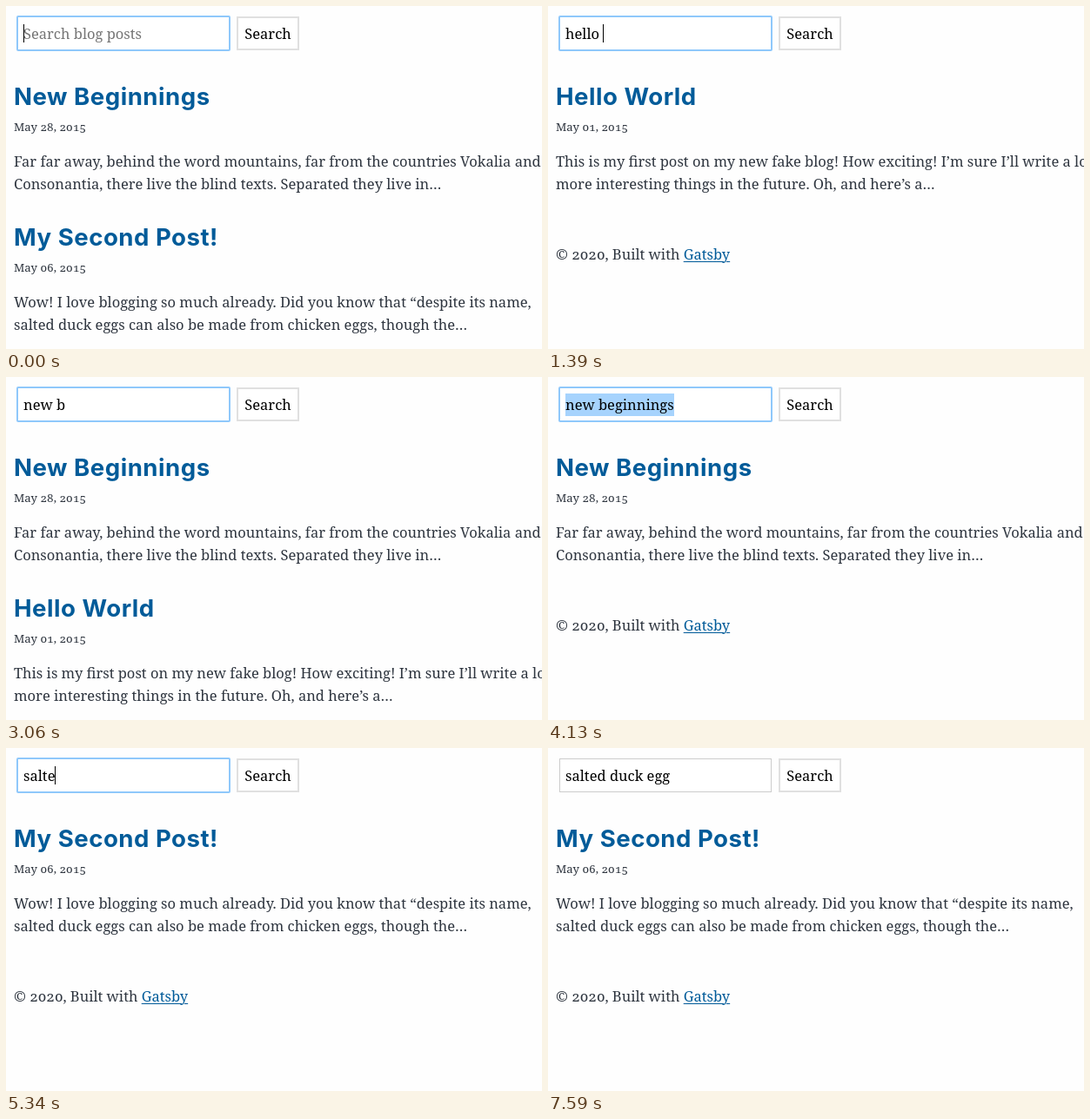
Write an HTML page that moves like this. It is 616 px wide and 395 px high and loops after 8120 ms.

```html
<!DOCTYPE html>
<html lang="en">
<head>
<meta charset="utf-8">
<title>Blog search</title>
<style>
  html, body { margin: 0; width: 100%; height: 100%; overflow: hidden; background: #fefefe; }
  body {
    position: relative;
    font: 16.5px/26px "Noto Serif", serif;
    font-variant-numeric: oldstyle-nums tabular-nums;
    color: #2e353f;
    white-space: nowrap;
  }
  .box, .ring, .field, .hint, article, h2, time, p, footer { position: absolute; margin: 0; }
  .box { box-sizing: border-box; top: 12px; height: 39px; border: 1px solid #ccc; background: #fff; color: #000; }
  .input { left: 13px; width: 244px; }
  .button { left: 265px; width: 72px; border: 2px solid #e0e0e0; line-height: 35px; text-align: center; }
  .ring {
    box-sizing: border-box; left: 12px; top: 11px; width: 246px; height: 41px;
    border: 2px solid #8fc8fb; border-radius: 2px;
    animation: blur 8120ms linear infinite;
  }
  @keyframes blur { 0%, 90.27% { opacity: 1 } 93.47%, 100% { opacity: 0 } }
  .field, .hint { left: 20px; top: 19px; white-space: pre; }
  .field { display: flex; color: #000; }
  .hint { color: #757575; }
  .selected { background: #a6d3fd; }
  #caret { width: 1px; height: 21px; margin-top: 2px; background: #000; }
  article { left: 9px; top: 0; }
  h2 {
    top: 87px; font: 700 27.6px/34px Inter, sans-serif; letter-spacing: 0.5px;
    font-optical-sizing: none; color: #005b99;
  }
  time { top: 129px; font-size: 13.2px; line-height: 20px; }
  p { top: 166px; }
  footer { left: 9px; top: 273px; }
  footer span { color: #005b99; text-decoration: underline 1px; text-underline-offset: 2px; }
  [hidden] { display: none; }
</style>
</head>
<body>
  <div class="box input"></div>
  <div class="ring"></div>
  <div class="hint" id="hint">Search blog posts</div>
  <div class="field"><span id="query"></span><i id="caret"></i></div>
  <div class="box button">Search</div>

  <article id="N">
    <h2>New Beginnings</h2>
    <time>May 28, 2015</time>
    <p>Far far away, behind the word mountains, far from the countries Vokalia and<br>Consonantia, there live the blind texts. Separated they live in…</p>
  </article>
  <article id="S">
    <h2>My Second Post!</h2>
    <time>May 06, 2015</time>
    <p>Wow! I love blogging so much already. Did you know that “despite its name,<br>salted duck eggs can also be made from chicken eggs, though the…</p>
  </article>
  <article id="H">
    <h2>Hello World</h2>
    <time>May 01, 2015</time>
    <p>This is my first post on my new fake blog! How exciting! I’m sure I’ll write a lot<br>more interesting things in the future. Oh, and here’s a…</p>
  </article>
  <footer id="footer">© 2020, Built with <span>Gatsby</span></footer>

<script>
  const LOOP = 8120, POST_GAP = 162;
  const LEAD = 16; // a drawn frame appears one refresh later
  const OFF = 0, ON = 1, SELECTED = 2;
  const $ = id => document.getElementById(id);
  const steps = [];

  const add = (time, text, caret, posts) => steps.push({ time, text, caret, posts });

  // Types one more letter of the phrase at each evenly spaced step.
  function type(from, to, phrase, start, posts) {
    const count = phrase.length - start;
    const gap = (to - from) / (count - 1);
    for (let i = 0; i < count; i++)
      add(from + gap * i, phrase.slice(0, start + i + 1), ON, posts);
  }

  add(0, "", ON, "NS");
  add(240, "", OFF, "NS");
  add(440, "h", ON, "NS");
  add(510, "h", ON, "H");
  type(600, 880, "hello", 1, "H");
  type(1390, 1770, "hello world", 5, "H");
  add(1920, "hello world", OFF, "H");
  add(2160, "hello world", SELECTED, "H");

  add(2420, "", ON, "NS");
  add(2510, "n", ON, "NS");
  add(2690, "ne", ON, "NS");
  add(2750, "ne", ON, "NH");
  type(2820, 2900, "new ", 2, "NH");
  add(3060, "new b", OFF, "NH");
  add(3090, "new b", ON, "NH");
  type(3130, 3270, "new begin", 5, "N");
  type(3420, 3710, "new beginnings", 9, "N");
  add(4130, "new beginnings", SELECTED, "N");

  add(4510, "", ON, "NS");
  add(4780, "", OFF, "NS");
  add(4960, "s", ON, "NS");
  add(5050, "sa", ON, "S");
  type(5220, 5340, "salte", 2, "S");
  add(5520, "salted", ON, "S");
  add(5850, "salted", OFF, "S");
  type(5990, 6550, "salted duck eg", 6, "S");
  add(6730, "salted duck egg", ON, "S");
  add(6970, "salted duck egg", OFF, "S");

  let shown;
  function show(step) {
    if (step === shown) return;
    shown = step;
    const { text, caret, posts } = step;
    $("query").textContent = text;
    $("query").className = caret === SELECTED ? "selected" : "";
    $("caret").hidden = caret !== ON;
    $("hint").hidden = text !== "";
    $("footer").hidden = posts.length > 1;
    for (const id of "NSH") {
      const row = posts.indexOf(id);
      $(id).hidden = row < 0;
      $(id).style.top = row * POST_GAP + "px";
    }
  }

  function tick() {
    const now = (performance.now() + LEAD) % LOOP;
    show(steps.findLast(step => step.time <= now));
    requestAnimationFrame(tick);
  }
  tick();
</script>
</body>
</html>
```
